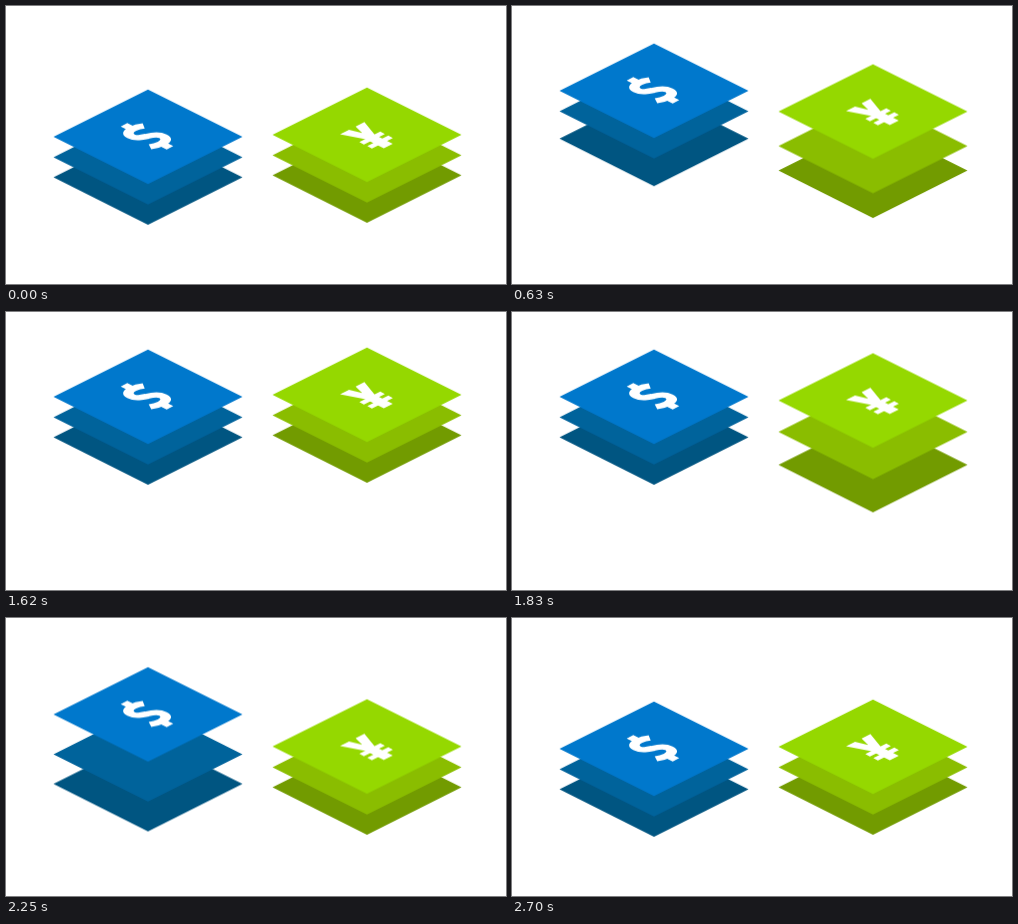
Animation of 500 by 278 pixels, one loop 3360 ms. Source, as an HTML page:

```html
<!DOCTYPE html>
<html lang="en">
<head>
<meta charset="utf-8">
<title>Currency stacks</title>
<style>
  html, body { margin: 0; width: 100%; height: 100%; overflow: hidden; background: #fff; }
  svg { display: block; width: 100%; height: 100%; }

  .layer { animation: 3360ms linear infinite; }
  .blue .top     { fill: #0078cc; animation-name: blue-top; }
  .blue .middle  { fill: #00639b; animation-name: blue-middle; }
  .blue .bottom  { fill: #005581; animation-name: blue-bottom; }
  .green .top    { fill: #95d800; animation-name: green-top; }
  .green .middle { fill: #8abd00; animation-name: green-middle; }
  .green .bottom { fill: #729b00; animation-name: green-bottom; }

  .dollar { fill: none; stroke: #fff; stroke-width: 7.4px; }
  .dollar .stem { stroke-width: 6.6px; }
  .yen { fill: #fff; }

  /* Rise top to bottom, blue first; settle in the opposite order. */
  @keyframes blue-top {
    0%, .92% { transform: translateY(0); animation-timing-function: cubic-bezier(.75, 0, .75, .9); }
    14.76%, 64.05% { transform: translateY(-46px); animation-timing-function: ease; }
    80.33%, 100% { transform: translateY(0); }
  }
  @keyframes blue-middle {
    0%, 3.66% { transform: translateY(0); animation-timing-function: cubic-bezier(.75, 0, .75, .9); }
    17.5%, 60.57% { transform: translateY(-46px); animation-timing-function: ease; }
    76.85%, 100% { transform: translateY(0); }
  }
  @keyframes blue-bottom {
    0%, 6.85% { transform: translateY(0); animation-timing-function: cubic-bezier(.75, 0, .75, .9); }
    20.68%, 57.29% { transform: translateY(-46px); animation-timing-function: ease; }
    73.57%, 100% { transform: translateY(0); }
  }
  @keyframes green-top {
    0%, 8.96% { transform: translateY(0); animation-timing-function: cubic-bezier(.75, 0, .75, .9); }
    22.8%, 52.59% { transform: translateY(-46px); animation-timing-function: ease; }
    68.87%, 100% { transform: translateY(0); }
  }
  @keyframes green-middle {
    0%, 11.82% { transform: translateY(0); animation-timing-function: cubic-bezier(.75, 0, .75, .9); }
    25.65%, 50.77% { transform: translateY(-46px); animation-timing-function: ease; }
    67.05%, 100% { transform: translateY(0); }
  }
  @keyframes green-bottom {
    0%, 13.48% { transform: translateY(0); animation-timing-function: cubic-bezier(.75, 0, .75, .9); }
    27.32%, 48.42% { transform: translateY(-46px); animation-timing-function: ease; }
    64.7%, 100% { transform: translateY(0); }
  }
</style>
</head>
<body>
<svg viewBox="0 0 500 278">
  <defs>
    <path id="tile" d="M0-47.3 94.5 0 0 47.3-94.5 0Z"/>
  </defs>
  <g class="blue" transform="translate(142 130.8)">
    <g class="layer bottom"><use href="#tile" y="40.6"/></g>
    <g class="layer middle"><use href="#tile" y="20.4"/></g>
    <g class="layer top">
      <use href="#tile"/>
      <g class="dollar" role="img" aria-label="$" transform="matrix(1 -.5 1 .5 0 0)">
        <path d="M8.7-13C6-14.8 3-15.5 0-15.5C-5-15.5-8-13-8-9C-8-4-4-2.5 0-1C4.5.5 8 2.5 8 7C8 11.5 5 13.5 0 13.5C-3 13.5-6 12.8-9 11"/>
        <path class="stem" d="M0-24V-15M0 13V22"/>
      </g>
    </g>
  </g>
  <g class="green" transform="translate(361 128.8)">
    <g class="layer bottom"><use href="#tile" y="40.6"/></g>
    <g class="layer middle"><use href="#tile" y="20.4"/></g>
    <g class="layer top">
      <use href="#tile"/>
      <g class="yen" role="img" aria-label="¥" transform="matrix(1 -.5 1 .5 0 0)">
        <path d="M-13-14H-4L-.7-4 2.6-14H11.4L3.8 4V22H-5.2V4Z"/>
        <path d="M-11.2 3.5h21v4.6h-21ZM-11.2 11.5h21v4.6h-21Z"/>
      </g>
    </g>
  </g>
</svg>
</body>
</html>
```
